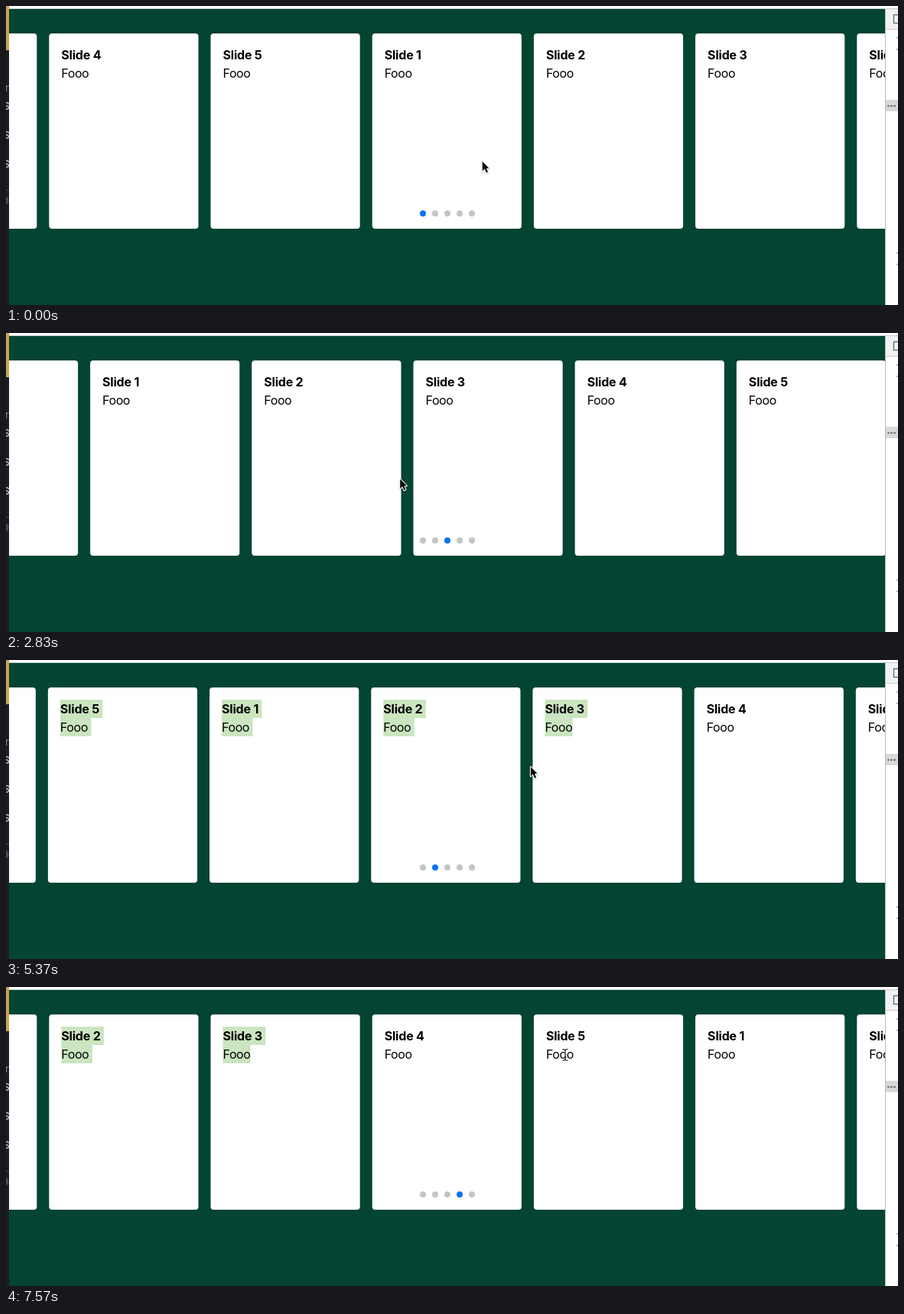
These frames come from a looping animation (1166 px wide and 392 px high, 8 s). An HTML page with a canvas:

```html
<!DOCTYPE html>
<html lang="en">
<head>
<meta charset="utf-8">
<title>Carousel</title>
<style>
  html, body { margin: 0; width: 100%; height: 100%; overflow: hidden; background: #034432; }
  canvas { display: block; }
</style>
</head>
<body>
<canvas id="stage" width="1166" height="392"></canvas>
<script>
const ctx = document.getElementById('stage').getContext('2d');
const LOOP = 8000;
const GREEN = '#034432';
const PITCH = 211.2, CARD_W = 195.2, CENTER = 478.7;
const TITLE = '700 16px Inter, sans-serif';
const BODY = '400 16px Inter, sans-serif';
const SELECT_AT = 5200, LAST_SELECTED = 2;

// Every gesture: wait, drag to `far`, release, then glide back to `rest`.
const WAIT = 60, RELEASE = 230, GLIDE = 540, SETTLE = 470, HELD = 0.587;
const HOME = [622, 203];
// dir steps to a neighbour; pull tugs the cards and lets them fall back
const GESTURES = [
  { at: 1471, dir: 1, far: [468, 227], rest: [618, 191] },
  { at: 2531, dir: 1, far: [512, 191], rest: [566, 185] },
  { at: 3530, pull: -0.45, far: [660, 160], rest: [681, 151] },
  { at: 4370, pull: 0.5, far: [520, 158], rest: [560, 150] },
  { at: 4791, dir: -1, far: [688, 140], rest: [684, 139] },
  { at: 5900, dir: 1, far: [590, 92], rest: [714, 89] },
  { at: 6730, dir: 1, far: [580, 92], rest: [731, 89] }
];

const clamp = v => Math.max(0, Math.min(1, v));
const ease = v => v * v * (3 - 2 * v);
const mix = (a, b, u) => a.map((v, i) => v + (b[i] - v) * u);
const reach = dt => clamp((dt - WAIT) / (RELEASE - WAIT));
const glide = dt => clamp((dt - RELEASE) / GLIDE);

function swipe(dt) {
  if (dt < RELEASE) return HELD * Math.pow(reach(dt), 1.5);
  return 1 - (1 - HELD) * Math.pow(1 - clamp((dt - RELEASE) / SETTLE), 3);
}

const tug = dt => Math.sin(Math.PI * clamp(dt / (RELEASE + GLIDE))) ** 2;

const position = t => GESTURES.reduce((s, g) =>
  s + (g.dir ? g.dir * swipe(t - g.at) : g.pull * tug(t - g.at)), 0);

const activeDot = t => GESTURES.reduce((n, g) =>
  t > g.at + RELEASE + 5 ? n + (g.dir || 0) : n, 0);

const pointer = t => GESTURES.reduce((p, g) =>
  mix(mix(p, g.far, ease(reach(t - g.at))), g.rest, ease(glide(t - g.at))), HOME);

function rect(color, x, y, w, h) {
  ctx.fillStyle = color;
  ctx.fillRect(x, y, w, h);
}

function disc(color, x, y, r) {
  ctx.fillStyle = color;
  ctx.beginPath();
  ctx.arc(x, y, r, 0, Math.PI * 2);
  ctx.fill();
}

function clipped(x, y, w, h, paint) {
  ctx.save();
  ctx.beginPath();
  ctx.rect(x, y, w, h);
  ctx.clip();
  paint();
  ctx.restore();
}

function label(text, font, spacing, x, y, selected, tail) {
  ctx.font = font;
  ctx.letterSpacing = spacing;
  if (selected) rect('#cae5bf', x, y - 18, ctx.measureText(text).width + tail, 24);
  ctx.fillStyle = '#000';
  ctx.fillText(text, x, y);
}

function card(k, x, selecting) {
  ctx.fillStyle = '#fff';
  ctx.beginPath();
  ctx.roundRect(x, 36, CARD_W, 256, 4);
  ctx.fill();
  const n = ((k % 5) + 5) % 5 + 1;
  const on = selecting && k <= LAST_SELECTED;
  label('Slide ' + n, TITLE, '-0.2px', x + 16, 70, on, 4.3);
  label('Fooo', BODY, '-0.4px', x + 16, 94, on, k < LAST_SELECTED ? 4.5 : 0);
}

function carousel(t, s) {
  rect(GREEN, 0, 0, 1166, 392);
  const first = Math.floor(s) - 3;
  for (let k = first; k < first + 8; k++) card(k, CENTER + (k - s) * PITCH, t >= SELECT_AT);
  const active = activeDot(t);
  for (let i = 0; i < 5; i++) disc(i === active ? '#0a72ef' : 'rgba(0,0,0,.23)', 545 + 16 * i, 272, 4);
}

function leftEdge() {
  rect('#1c1d25', 0, 0, 4, 392);
  rect('#c8a250', 0, 0, 4, 58);
  ctx.letterSpacing = '0px';
  ctx.textAlign = 'right';
  ctx.font = '13px Inter, sans-serif';
  ctx.fillStyle = '#85868c';
  ctx.fillText('r', 4, 112);
  ctx.font = '600 13px Inter, sans-serif';
  ctx.fillStyle = '#b5b6bd';
  for (let i = 0; i < 3; i++) ctx.fillText('S', 5, 136 + 38 * i);
  rect('#4a4b50', 0, 241, 4, 1);
  disc('#4b4c52', -2, 255, 5.5);
}

function rightEdge() {
  rect('#fff', 1149, 0, 17, 392);
  rect('#f0f1f2', 1150, 4, 16, 26);
  rect('#cbcbcb', 1149, 3, 17, 1);
  rect('#cbcbcb', 1149, 30, 17, 1);
  rect('#b9bcbb', 1149, 4, 1, 388);
  ctx.strokeStyle = '#666';
  ctx.lineWidth = 1.3;
  ctx.strokeRect(1160.5, 11.5, 10, 11);
  rect('#d9d9d9', 1150, 123, 16, 15);
  for (let i = 0; i < 3; i++) disc('#666', 1153.5 + 4 * i, 131, 1.3);
  for (const y of [41, 323]) {
    rect('#999', 1164, y, 2, 1.5);
    rect('#999', 1164, y + 15, 2, 1.5);
  }
}

function arrow(x, y) {
  ctx.save();
  ctx.translate(x, y + 0.8);
  ctx.scale(0.94, 0.94);
  ctx.shadowColor = 'rgba(0,0,0,.25)';
  ctx.shadowBlur = 2;
  ctx.shadowOffsetY = 1;
  ctx.strokeStyle = '#fff';
  ctx.lineWidth = 2.2;
  ctx.lineJoin = 'round';
  const shape = new Path2D('M.8 0V13.2L3.9 10.4 6.3 15.7 8.5 14.7 6.2 9.5 10 9.4Z');
  ctx.stroke(shape);
  ctx.shadowColor = 'transparent';
  ctx.fillStyle = '#000';
  ctx.fill(shape);
  ctx.restore();
}

function ibeam(x, y) {
  ctx.beginPath();
  for (const d of [-1, 1]) {
    ctx.moveTo(x - 3.5, y + 7.5 * d);
    ctx.quadraticCurveTo(x, y + 7.5 * d, x, y + 5 * d);
    ctx.quadraticCurveTo(x, y + 7.5 * d, x + 3.5, y + 7.5 * d);
  }
  ctx.moveTo(x, y - 5.5);
  ctx.lineTo(x, y + 5.5);
  ctx.moveTo(x - 2, y + 3);
  ctx.lineTo(x + 2, y + 3);
  for (const [color, width] of [['rgba(255,255,255,.8)', 2.6], ['#111', 1.1]]) {
    ctx.strokeStyle = color;
    ctx.lineWidth = width;
    ctx.stroke();
  }
}

function cursor(t, s) {
  const [x, y] = pointer(t);
  const offset = x - CENTER + s * PITCH;
  const local = offset - Math.floor(offset / PITCH) * PITCH;
  const overText = local > 16 && local < CARD_W - 16 && y > 52 && y < 100;
  (overText ? ibeam : arrow)(x, y);
}

function draw(now) {
  const t = now % LOOP;
  const s = position(t);
  rect('#fff', 0, 0, 1166, 392);
  clipped(4, 3.8, 1145, 389, () => carousel(t, s));
  clipped(0, 0, 4, 392, leftEdge);
  rightEdge();
  cursor(t, s);
  requestAnimationFrame(draw);
}
requestAnimationFrame(draw);
</script>
</body>
</html>
```
